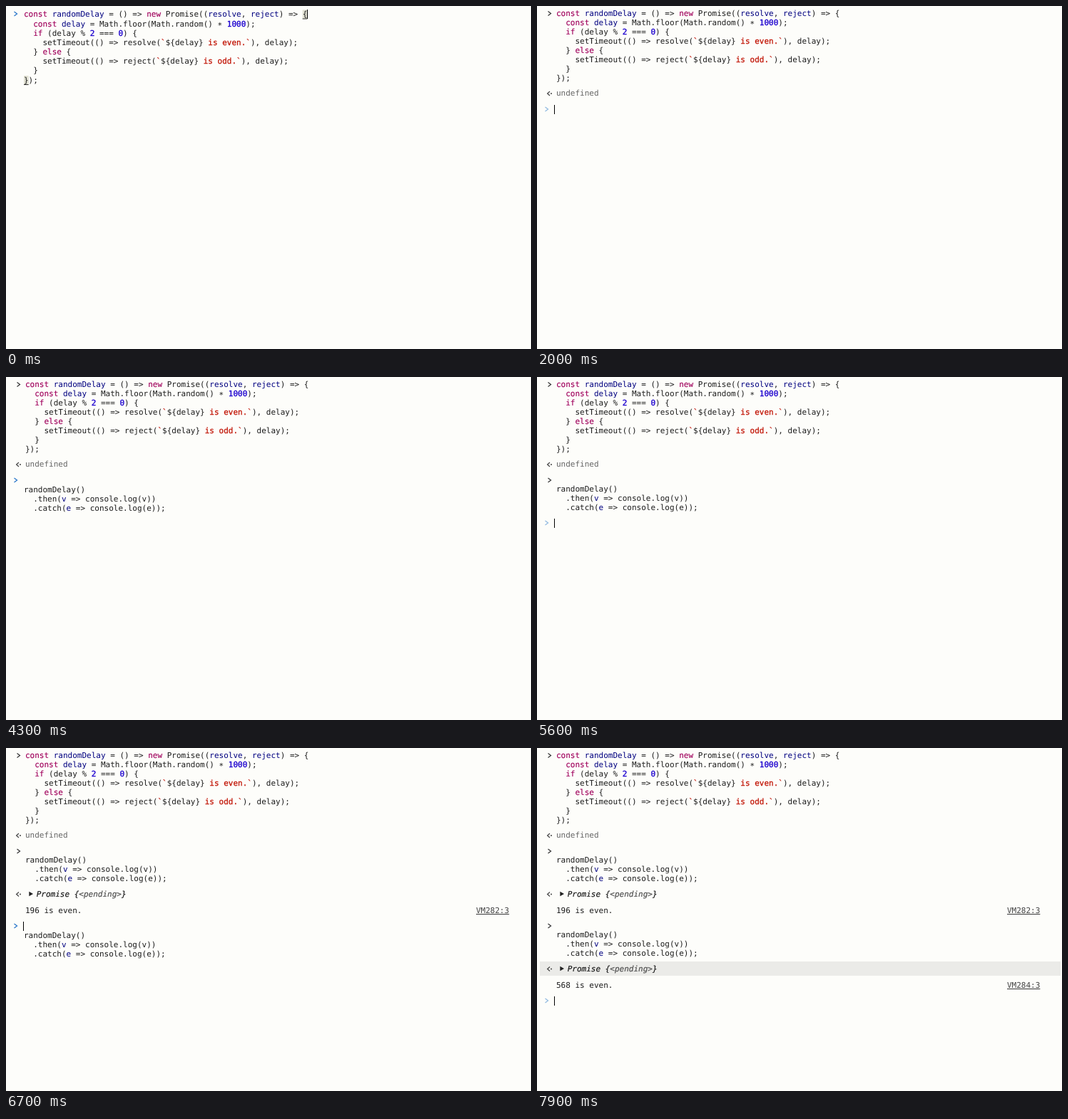
Recreate the animation shown at these times as an HTML page. Size 736 by 482 pixels, loop 8 s.

```html
<!DOCTYPE html>
<html lang="en">
<head>
<meta charset="utf-8">
<title>Console session</title>
<style>
  html, body { margin: 0; width: 100%; height: 100%; overflow: hidden; background: #fdfdfa; }
  svg { display: block; width: 736px; height: 482px; }
  text {
    font: 11px "DejaVu Sans Mono", monospace;
    text-rendering: geometricPrecision;
    white-space: pre;
    fill: #1c1c1c;
  }
  .k { fill: #a0005c; stroke: #a0005c; stroke-width: .15px; }
  .v { fill: #000080; }
  .n { fill: #1c00cf; stroke: #1c00cf; stroke-width: .35px; }
  .s { fill: #c01000; stroke: #c01000; stroke-width: .25px; }
  .dim { fill: #666; }
  .link { fill: #444; text-decoration: underline; }
  .italic { font-style: italic; stroke: #1c1c1c; stroke-width: .2px; }
  .italic .dim { fill: #505050; stroke: #505050; }
  .mark { fill: none; stroke-width: 1.2; }
</style>
</head>
<body>
<svg id="stage" viewBox="0 0 736 482" xmlns="http://www.w3.org/2000/svg"></svg>
<script>
const LOOP = 8000;
const BLINK = 500;
const CHAR = 6.622;
const stage = document.getElementById('stage');

// [k ...] keyword, [v ...] definition, [n ...] number, [s ...] string
const definition = [
  '[k const] [v randomDelay] = () => [k new] Promise(([v resolve], [v reject]) => {',
  '  [k const] [v delay] = Math.floor(Math.random() * [n 1000]);',
  '  [k if] (delay % [n 2] === [n 0]) {',
  '    setTimeout(() => resolve([s `]${delay}[s  is even.`]), delay);',
  '  } [k else] {',
  '    setTimeout(() => reject([s `]${delay}[s  is odd.`]), delay);',
  '  }',
  '});'
];
const call = [
  'randomDelay()',
  '  .then([v v] => console.log(v))',
  '  .catch([v e] => console.log(e));'
];

// The asterisk sits lower, on the middle of the line
const paint = line => line
  .replace(/\[(\w) (.*?)\]/g, '<tspan class="$1">$2</tspan>')
  .replace('* ', '<tspan dy="1.6">*</tspan><tspan dy="-1.6"> </tspan>');
const text = (x, y, content, cls = '') => `<text x="${x}" y="${y}" class="${cls}">${content}</text>`;
const block = (lines, x, yOf) => lines.map((line, i) => text(x, yOf(i), paint(line))).join('');
const rect = (x, y, w, h, fill) => `<rect x="${x}" y="${y}" width="${w}" height="${h}" fill="${fill}"/>`;
const chevron = (x, y, color) =>
  `<path class="mark" stroke="${color}" d="M${x} ${y - 3}l4 3l-4 3"/>`;
const caret = (x, y) => rect(x, y - 6, 1, 13, '#000');
const prompt = (y, empty) => chevron(11.5, y, empty ? '#8fb8e0' : '#2272c8');
const entered = y => chevron(15.5, y, '#333');
const returned = y =>
  `<path class="mark" stroke="#444" d="M18 ${y - 2.5}l-3.4 3l3.4 3"/>` +
  `<circle cx="20" cy="${y + .5}" r="1" fill="#444"/>`;

const enteredCall = y => entered(y) + block(call, 27, i => y + 16 + 13 * i);
const draftCall = y => prompt(y, false) + block(call, 25, i => y + 17 + 13 * i);
const promise = y => returned(y) +
  `<path d="M32.3 ${y - 3.3}l5.7 3.3l-5.7 3.3z" fill="#222"/>` +
  text(42.7, y + 4, 'Promise {<tspan class="dim">&lt;pending&gt;</tspan>}', 'italic');
const logged = (y, message, source) =>
  text(27, y + 4, message) + text(659, y + 4, source, 'link');

const pointer = '<path d="M301.8 314.5v13.2l3-2.8l2.2 4.8l2.2-1l-2.2-4.7h4.1z" ' +
  'fill="#000" stroke="#fff" stroke-width="1" paint-order="stroke"/>';

function bracket(x, y) {
  return rect(x, y, CHAR, 12.5, '#e2e2d4') + rect(x, y + 12, CHAR, 1, '#333');
}

function firstDraft(t) {
  const brackets = t < 700 ? bracket(25 + 59 * CHAR, 5.5) + bracket(25, 98) : '';
  let cursor = '';
  if (t < 200) cursor = caret(422, 11);
  else if (t >= 700 && t < 1200) cursor = caret(24, 117);
  return brackets + prompt(11, false) +
    block(definition, 25, i => Math.floor(15.96 + 13.15 * i)) +
    cursor + (t >= 100 ? pointer : '');
}

function history(t) {
  let out = '';
  if (t >= 7000) out += rect(4, 300, 730, 20, '#ebebe8');
  out += entered(10.5) + block(definition, 27, i => 14 + 13 * i);
  out += returned(122.5) + text(27, 126, 'undefined', 'dim');
  if (t >= 5600) out += enteredCall(145);
  if (t >= 5700) out += promise(205);
  if (t >= 5900) out += logged(228, '196 is even.', 'VM282:3');
  if (t >= 6900) out += enteredCall(250);
  if (t >= 7000) out += promise(310);
  if (t >= 7500) out += logged(333, '568 is even.', 'VM284:3');
  return out;
}

// Each step: start, prompt row, caret x, caret row, has a draft, start of the blink cycle
const steps = [
  [1600, 145, 24, 145, false, 1600],
  [2800, 145, 223, 184, true, 2800],
  [5600, 205, 24, 205, false, 5600],
  [5700, 228, 24, 228, false, 5600],
  [5900, 250, 24, 250, false, 5600],
  [6300, 250, 24, 250, true, 6300],
  [6900, 310, 24, 310, false, 6900],
  [7000, 333, 24, 333, false, 6900],
  [7500, 355, 24, 355, false, 6900]
];

function input(t) {
  const [, row, x, caretRow, hasDraft, blinkFrom] = steps.filter(s => t >= s[0]).pop();
  const visible = Math.floor((t - blinkFrom) / BLINK) % 2 === 0;
  return (hasDraft ? draftCall(row) : prompt(row, true)) + (visible ? caret(x, caretRow) : '');
}

let shown = '';
function draw(t) {
  const markup = t < steps[0][0] ? firstDraft(t) : history(t) + input(t);
  if (markup !== shown) stage.innerHTML = shown = markup;
}

const start = performance.now();
function tick() {
  draw((performance.now() - start) % LOOP);
  requestAnimationFrame(tick);
}
tick();
</script>
</body>
</html>
```
